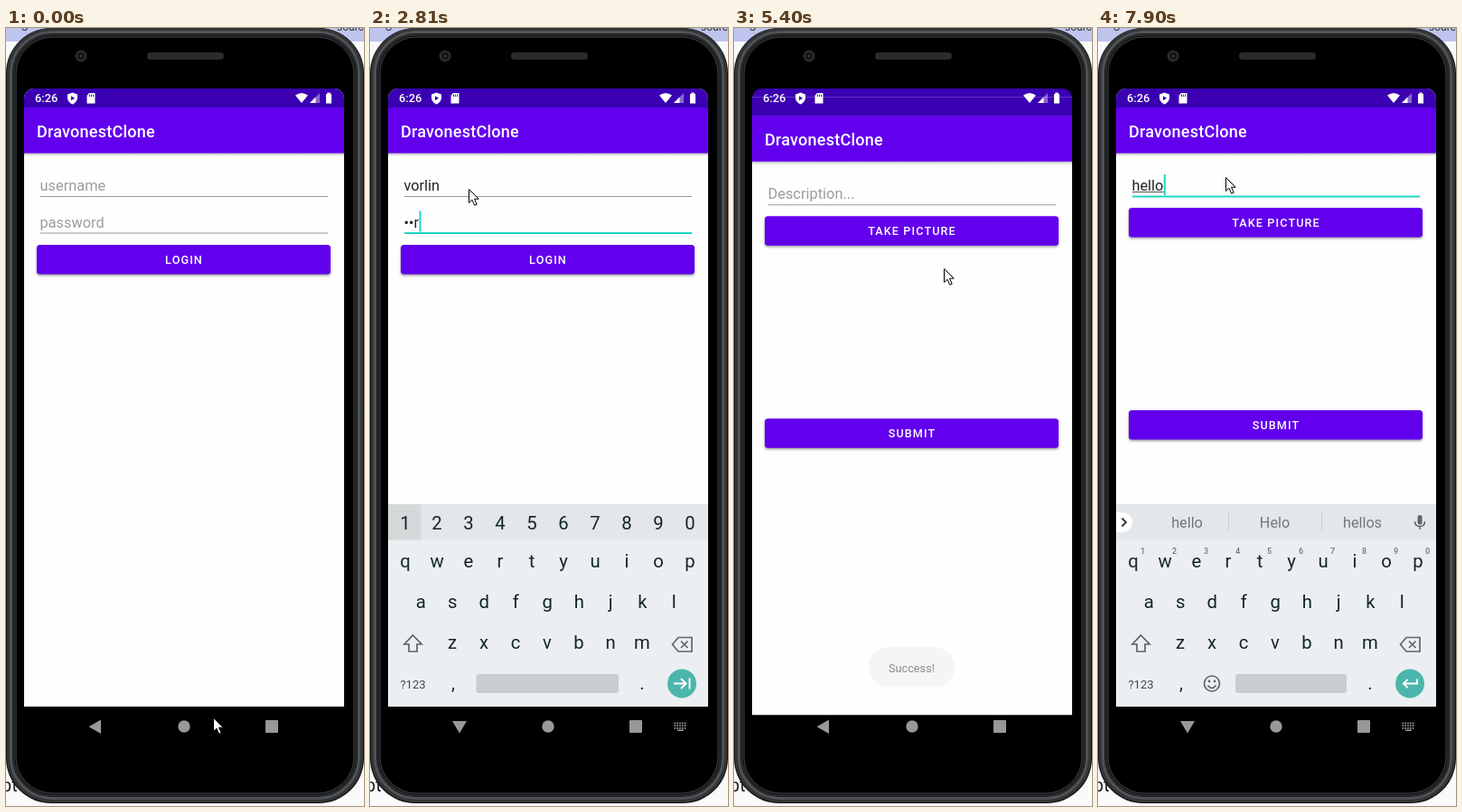
These frames come from a looping animation (396 px wide and 861 px high, 8 s). An HTML page with a canvas:

```html
<!DOCTYPE html>
<html lang="en">
<head>
<meta charset="utf-8">
<title>Phone login and post</title>
<style>
  html, body { margin: 0; width: 100%; height: 100%; overflow: hidden; background: #fafafa; }
  canvas { display: block; }
</style>
</head>
<body>
<canvas id="stage" width="396" height="861"></canvas>
<script>
const c = document.getElementById('stage').getContext('2d');
const LOOP = 8000, PURPLE = '#6200ee', TEAL = '#1fd6c4', INK = '#5a666c';
const FIELD = 16.3;

const clamp = v => Math.max(0, Math.min(1, v));
const span = (t, from, to) => clamp((t - from) / (to - from));
const smooth = p => p * p * (3 - 2 * p);
// value of the last [time, value] entry that has started
const latest = (list, t) => list.reduce((v, e) => e[0] <= t ? e[1] : v, null);

const typedName = [[0, ''], [1710, 'v'], [1790, 'vo'], [1870, 'vor'], [2020, 'vorl'], [2180, 'vorli'], [2260, 'vorlin']];
const typedPass = [[0, ''], [2660, 'v'], [2810, '••r'], [2960, '•••l'], [3040, '••••i'], [3270, '•••••n'], [4770, '••••••']];
const typedPost = [[0, ''], [7270, 'h'], [7430, 'he'], [7670, 'hel'], [7750, 'hell'], [7900, 'hello']];
const hints = [
  [0, 'thanks I we'], [1710, 'v I very'], [1790, 'vo to vote'], [1870, 'vor for vote'],
  [2020, 'vorl work world'], [2180, 'vorli world voila'], [2260, 'vorlin violin worlds'],
  [2400, 'thanks I we'], [7270, 'h hi have'], [7430, 'he the her'], [7670, 'hel hello help'],
  [7750, 'hell he\'ll hello'], [7900, 'hello Helo hellos']
];
const caretOn = [[0, false], [930, true], [1480, false], [1710, true], [3820, false], [4290, true],
  [4770, false], [6500, true], [7030, false], [7270, true]];
const pointer = [[0, 229, 763], [30, 229, 763], [620, 112, 141], [850, 109, 166], [1020, 109, 178],
  [3600, 109, 178], [3900, 227, 266], [4940, 227, 266], [5000, 232, 266], [5950, 232, 266],
  [6180, 161, 184], [6300, 142, 154], [6460, 141, 165], [8000, 141, 165]];

function rect(x, y, w, h, color, r = 0) {
  c.fillStyle = color;
  c.beginPath();
  c.roundRect(x, y, w, h, r);
  c.fill();
}
function disc(x, y, r, color) {
  c.fillStyle = color;
  c.beginPath();
  c.arc(x, y, r, 0, 7);
  c.fill();
}
function shape(d, color) {
  c.fillStyle = color;
  c.fill(new Path2D(d));
}
function line(d, color, width = 1) {
  c.strokeStyle = color;
  c.lineWidth = width;
  c.stroke(new Path2D(d));
}
function text(s, x, y, size, color, align = 'left', weight = 400, gap = 0) {
  c.font = `${weight} ${size}px Roboto, sans-serif`;
  c.letterSpacing = gap + 'px';
  c.textAlign = align;
  c.fillStyle = color;
  c.fillText(s, x, y);
  return c.measureText(s).width;
}

function phone() {
  rect(0, 0, 396, 861, '#fafafa');
  rect(0, 0, 396, 15, '#bfc5ee');
  text('S', 17, 3, 12, '#333');
  text('source', 366, 3, 12, '#333');
  text('pt', -5, 845, 20, '#222');
  rect(0, 0, 396, 858, '#111112', 50);
  [[2.5, 3, '#333537'], [5.5, 3, '#505356'], [8.5, 2, '#2a2b2d'], [11, 1, '#3b3d40']].forEach(([d, w, color]) => {
    c.strokeStyle = color;
    c.lineWidth = w;
    c.beginPath();
    c.roundRect(d, d - 1, 396 - 2 * d, 859 - 2 * d, 51 - d);
    c.stroke();
  });
  rect(12, 11, 372, 835, '#000', 40);
  disc(83, 31, 6.5, '#2c2c2d');
  disc(83, 31, 4, '#151516');
  disc(83, 31, 1.5, '#343436');
  rect(156, 27, 85, 8, '#2b2b2c', 4);
}

function statusIcons() {
  text('6:26', 32, 82, 12.8, '#fff', 'left', 500);
  shape('M73.5 71.5L79 73.5V77.5Q78.500 82 73.500 84.500Q68.500 82 68 77.500V73.500Z', '#fff');
  shape('M72 75.200L76 77.700L72 80.200Z', '#3700b3');
  shape('M92 72H98.500V83.500H89.500V74.800Z', '#fff');
  line('M92.500 73.500V76M94.500 73.500V76M96.500 73.500V76', '#3700b3', .9);
  shape('M320 74.500Q327 69.500 334 74.500L327 83Z', '#fff');
  shape('M347 72V83H336Z', 'rgba(255,255,255,.4)');
  shape('M342.500 76.500V83H336Z', '#fff');
  shape('M355.300 71.500H358.700V73H360V83.500H354V73H355.300Z', '#fff');
}

function button(label, y) {
  c.save();
  c.shadowColor = 'rgba(0,0,0,.4)';
  c.shadowBlur = 3;
  c.shadowOffsetY = 1.5;
  rect(34, y, 325, 32.5, PURPLE, 3.5);
  c.restore();
  text(label, 197, y + 21, 12.6, '#fff', 'center', 500, 1.125);
}

function field(value, hint, y, focused, caret, composing) {
  if (focused) rect(38, y + 11.5, 318, 2, TEAL);
  else rect(38, y + 12, 318, 1, '#9a9a9a');
  if (!value) text(hint, 37.5, y + 6, FIELD, '#9c9c9c', 'left', 400, .05);
  const w = value ? text(value, 37.5, y + 6, FIELD, '#222') : 0;
  if (composing && value) rect(38, y + 7, w, 1, '#555');
  if (focused && caret) rect(38 + w, y - 12, 2, 23, TEAL);
}

function page(draw) {
  rect(20, 67, 354, 684, '#fefefe');
  const shade = c.createLinearGradient(0, 138, 0, 142);
  shade.addColorStop(0, 'rgba(0,0,0,.3)');
  shade.addColorStop(1, 'rgba(0,0,0,0)');
  rect(20, 138, 354, 4, shade);
  rect(20, 67, 354, 21.5, '#3a00b2');
  rect(20, 88, 354, 50.5, PURPLE);
  text('DravonestClone', 34, 121, 18, '#fff', 'left', 500, .225);
  draw();
}

function loginPage(t) {
  const inPass = t >= 2380, caret = latest(caretOn, t);
  page(() => {
    field(latest(typedName, t), 'username', 174, t >= 850 && !inPass, caret, !inPass);
    field(latest(typedPass, t), 'password', 214.5, inPass, caret);
    button('LOGIN', 240);
    const p = span(t, 4480, 4850);
    if (p > 0 && p < 1) {
      c.save();
      c.beginPath();
      c.roundRect(34, 240, 325, 32.5, 3.5);
      c.clip();
      disc(227, 266, 30 + 220 * p, `rgba(255,255,255,${.24 * (1 - p)})`);
      c.restore();
    }
  });
}

function postPage(t) {
  page(() => {
    field(latest(typedPost, t), 'Description...', 174, t >= 6500, latest(caretOn, t), true);
    button('TAKE PICTURE', 199);
    button('SUBMIT', 423);
  });
}

function keyRow(keys, x, y, step = 35) {
  [...keys].forEach((k, i) => text(k, x + i * step, y, 20.3, '#13252d', 'center'));
}

function keyboard(t, secret) {
  rect(20, 527, 354, 224, '#eceff1');
  rect(20, 751, 354, 42, '#000');
  rect(20, 527, 354, 39.5, '#e3e7e9');
  if (secret) {
    rect(20, 527, 36.5, 39.5, '#d6d9da');
    keyRow('1234567890', 39, 555);
  } else {
    rect(10, 536, 28, 22, '#fff', 11);
    line('M26.500 542.500L31 547L26.500 551.500', '#333', 1.8);
    rect(144, 536, 1, 21, '#cbd0d2');
    rect(247, 536, 1, 21, '#cbd0d2');
    latest(hints, t).split(' ').forEach((word, i) => {
      const strong = i === 1 && t >= 1710 && t < 1790;
      text(word, 98.5 + 97 * i, 553, 16.2, strong ? '#111' : '#70777b', 'center', strong ? 700 : 400);
    });
    rect(353.500, 539, 5, 10.500, INK, 2.5);
    line('M350.500 546Q350.500 551.500 356 551.500Q361.500 551.500 361.500 546M356 551.500V555', INK, 1.5);
    [...'1234567890'].forEach((n, i) => text(n, 49.5 + 35 * i, 582, 9, '#68757b', 'center', 500));
  }
  keyRow('qwertyuiop', 39, 597);
  keyRow('asdfghjkl', 56.3, 642);
  keyRow('zxcvbnm', 91, 687);
  line('M47.500 672L57 682H52V690H43V682H38Z', INK, 1.7);
  line('M341 674.500H356V690H341L334.500 682.200ZM344 678.500L351.500 686M351.500 678.500L344 686', INK, 1.7);
  text('?123', 47.5, 730.5, 13, '#3c4a51', 'center');
  text(',', 92, 732, 20, '#13252d', 'center');
  text('.', 301, 732, 20, '#13252d', 'center');
  const left = secret ? 117.5 : 152;
  rect(left, 715, 275 - left, 21, '#c8cdcf', 3);
  if (!secret) {
    line('M134.500 725.500A8.500 8.500 0 1 1 117.500 725.500A8.500 8.500 0 1 1 134.500 725.500M121.500 727.500Q126 733.500 130.500 727.500', INK, 1.7);
    disc(123, 723, 1.4, INK);
    disc(129, 723, 1.4, INK);
  }
  disc(345, 725.5, 16, '#4cb6ac');
  line(secret ? 'M336 725.500H349M344 720L349.500 725.500L344 731M353.500 719.500V731.500'
    : 'M353 720.500V725.500H338M342.500 721L338 725.500L342.500 730', '#fff', 1.9);
}

function navIcons(typing) {
  const grey = '#989898';
  shape(typing ? 'M91 767H107L99 780.500Z' : 'M105 765.500V781L91.500 773.200Z', grey);
  disc(197, 773, 6.7, grey);
  rect(287, 766, 14, 14, grey, 1);
  if (typing) {
    for (let i = 0; i < 15; i++) rect(336.5 + i % 5 * 2.8, 768.5 + Math.floor(i / 5) * 2.8, 1.7, 1.7, grey);
    rect(340, 776.5, 7, 1.5, grey);
  }
}

function toast(t) {
  c.globalAlpha = span(t, 5200, 5600) * (1 - span(t, 7200, 7500));
  rect(149, 685, 95, 44.5, '#eeeeee', 22);
  text('Success!', 196.5, 713, 12.7, '#222', 'center');
  c.globalAlpha = 1;
}

function arrow(t) {
  const i = Math.max(1, pointer.findIndex(k => k[0] > t));
  const [a, x0, y0] = pointer[i - 1], [b, x1, y1] = pointer[i];
  const p = smooth(span(t, a, b));
  c.save();
  c.translate(x0 + (x1 - x0) * p, y0 + (y1 - y0) * p);
  const d = 'M.5 .5V15.500L4 12.200L6.700 18.300L9.200 17.200L6.500 11.200H11.200Z';
  shape(d, '#fff');
  line(d, '#000');
  c.restore();
}

function pages(t) {
  const move = smooth(span(t, 5120, 5570));
  const reveal = 1 - (1 - span(t, 5120, 5385)) ** 2;
  if (reveal < 1) {
    c.save();
    c.translate(0, -17 * move);
    loginPage(t);
    c.restore();
    if (t > 5120) rect(20, 67, 354, 684, `rgba(0,0,0,${.09 * span(t, 5120, 5220)})`);
  }
  if (reveal > 0) {
    c.save();
    c.beginPath();
    c.rect(20, 751 - 684 * reveal, 354, 800);
    c.clip();
    if (move < 1) rect(20, 67, 354, 40, '#3a00b2');
    c.translate(0, 29 * (1 - move));
    postPage(t);
    c.restore();
  }
}

function render(t) {
  c.globalAlpha = 1;
  phone();
  c.save();
  c.beginPath();
  c.roundRect(20, 67, 354, 726, [11, 11, 0, 0]);
  c.clip();
  pages(t);
  statusIcons();

  const second = t > 5500;
  const enter = second ? span(t, 6530, 6810) : span(t, 900, 1250);
  const leave = second ? 0 : span(t, 5160, 5360);
  if (enter > 0 && leave < 1) {
    c.save();
    c.globalAlpha = enter * (1 - leave ** 1.3);
    c.translate(0, 28 * (1 - enter) ** 2 + 40 * leave);
    keyboard(t, t >= 2380 && !second);
    c.restore();
  }
  navIcons(enter > 0 && !leave);
  toast(t);
  c.restore();
  arrow(t);
}

function frame(now) {
  render(now % LOOP);
  requestAnimationFrame(frame);
}
requestAnimationFrame(frame);
</script>
</body>
</html>
```
